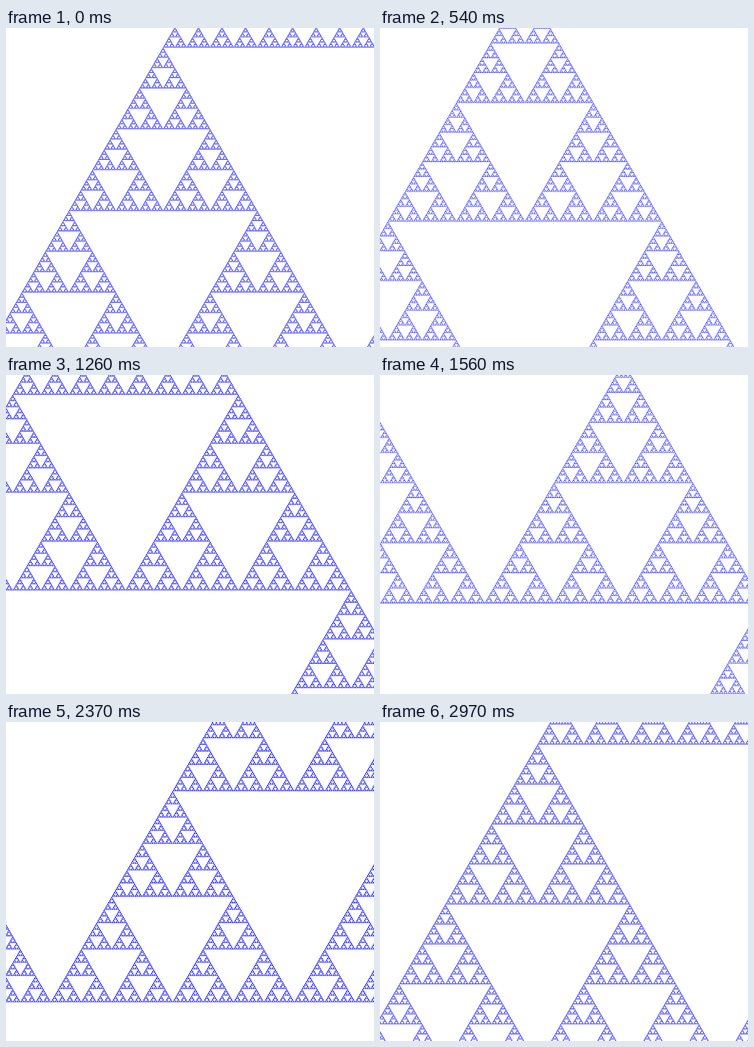
An HTML page with a canvas for the animation above (3000 ms loop, 500 px wide and 433 px high).

```html
<!DOCTYPE html>
<html lang="en">
<head>
<meta charset="utf-8">
<title>Endless Sierpinski zoom</title>
<style>
  html, body { margin: 0; width: 100%; height: 100%; overflow: hidden; background: #fff; }
  canvas { display: block; width: 500px; height: 433px; }
</style>
</head>
<body>
<canvas id="stage" width="500" height="433"></canvas>
<script>
const W = 500, H = 433;
const LOOP = 3000, STEP = 30, ZOOM = 8;
const SIDE = 2048;            // root triangle at the start of the loop
const LEAF = 2.8;             // triangles below this side are filled, not split
const TILE = LEAF * 32;       // triangles below this side share one path
const RATIO = Math.sqrt(3) / 2;
// The zoom centre has the repeating address right, left, top inside the triangle.
const FIX_X = 4.5 / 7, FIX_Y = 1 / 7;

const ctx = document.getElementById('stage').getContext('2d');

// Calls leaf(x, y, side) for each part below the limit; (x, y) is its lower left corner.
function split(x, y, side, limit, leaf) {
  const height = side * RATIO;
  if (x > W || x + side < 0 || y < 0 || y - height > H) return;
  if (side < limit) return leaf(x, y, side);
  const half = side / 2;
  split(x, y, half, limit, leaf);
  split(x + half, y, half, limit, leaf);
  split(x + half / 2, y - height / 2, half, limit, leaf);
}

function makeTile(side) {
  const path = new Path2D();
  split(0, H / 2, side, LEAF, (x, y, s) => {
    path.moveTo(x, y - H / 2);
    path.lineTo(x + s, y - H / 2);
    path.lineTo(x + s / 2, y - H / 2 - s * RATIO);
    path.closePath();
  });
  return path;
}

function draw(step) {
  const side = SIDE * Math.pow(ZOOM, step * STEP / LOOP);
  let tile;
  ctx.setTransform(1, 0, 0, 1, 0, 0);
  ctx.fillStyle = '#fff';
  ctx.fillRect(0, 0, W, H);
  ctx.fillStyle = '#00f';
  split(W / 2 - FIX_X * side, H / 2 + FIX_Y * side * RATIO, side, TILE, (x, y, s) => {
    tile = tile || makeTile(s);
    ctx.setTransform(1, 0, 0, 1, x, y);
    ctx.fill(tile);
  });
}

const start = performance.now();
let shown = -1;

function tick() {
  const time = Math.max(0, performance.now() - start) % LOOP;
  const step = Math.floor(time / STEP);
  if (step !== shown) draw(shown = step);
  requestAnimationFrame(tick);
}
tick();
</script>
</body>
</html>
```
